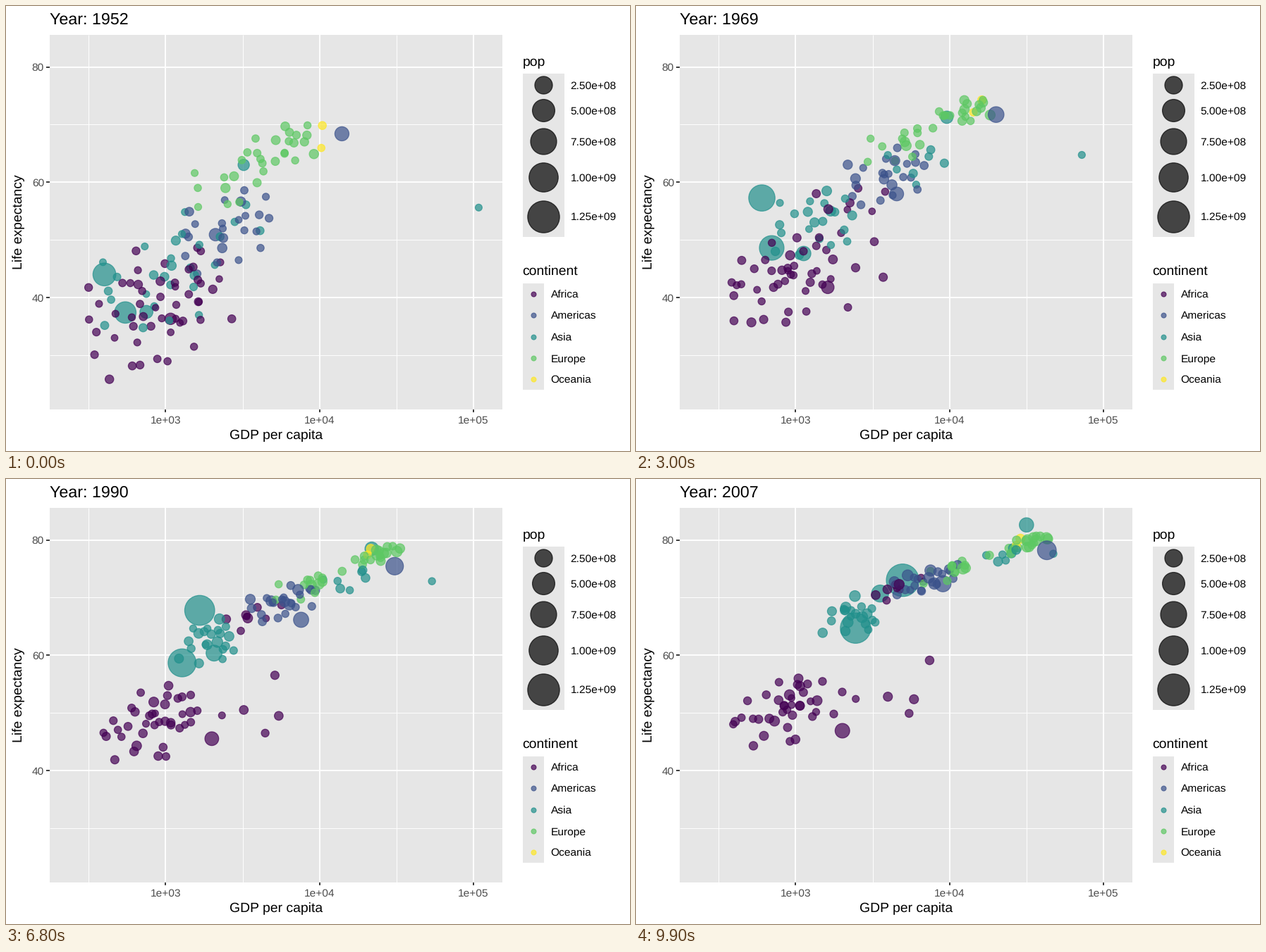
Recreate the animation shown at these times as a matplotlib script. Size 885 by 632 pixels, loop 10000 ms.

```python
import matplotlib.pyplot as plt
import numpy as np
from matplotlib.animation import FuncAnimation
from matplotlib.colors import to_rgba
from matplotlib.patches import Rectangle

W, H, DPI = 885, 632, 64
PT = 72 / DPI  # points per pixel
FRAMES = 100
YEARS = np.arange(1952, 2008, 5)
GREY = "#E6E6E6"
ALPHA = 0.7
LEFT, TOP, RIGHT, BOTTOM = 62, 41, 704, 572.5
BIG, SMALL = 19.35, 15.45

plt.rcParams["font.family"] = "Liberation Sans"
plt.rcParams["text.hinting"] = "none"

COLORS = {
    "Africa": "#440154",
    "Americas": "#3B528B",
    "Asia": "#21908C",
    "Europe": "#5DC863",
    "Oceania": "#FDE725",
}
# Crowds: continent, count, centre in 1952 and 2007 as (log10 income, life)
CROWDS = [
    ("Africa", 36, (2.94, 38.5), (2.97, 52)),
    ("Africa", 8, (3.20, 45), (3.72, 72.5)),
    ("Africa", 7, (3.20, 39), (3.65, 53)),
    ("Americas", 23, (3.46, 53), (3.88, 73.5)),
    ("Asia", 21, (3.00, 43.5), (3.40, 67.5)),
    ("Asia", 7, (3.45, 53), (4.45, 78)),
    ("Europe", 18, (3.82, 67.3), (4.51, 79.6)),
    ("Europe", 12, (3.48, 61), (4.08, 75.3)),
    ("Oceania", 2, (4.03, 69.4), (4.45, 80.7)),
]
# Standouts: continent, millions, (income, life) in 1952, 1977 and 2007
STOPS = (1952, 1977, 2007)
LEADERS = [
    ("Asia", 1319, (400, 44), (741, 63.9), (4959, 73)),
    ("Asia", 1110, (547, 37.4), (790, 54.2), (2452, 64.7)),
    ("Asia", 223, (750, 37.5), (1383, 52.7), (3541, 70.7)),
    ("Asia", 127, (3217, 63), (16610, 75.4), (31656, 82.6)),
    ("Asia", 2.5, (108382, 55.6), (59265, 69.3), (47307, 77.6)),
    ("Africa", 135, (1077, 36.3), (1982, 44.5), (2014, 46.9)),
    ("Americas", 190, (2109, 50.9), (6660, 61.5), (9066, 72.4)),
    ("Americas", 301, (13990, 68.4), (24073, 73.4), (42952, 78.2)),
]

rng = np.random.default_rng(7)
prog = (YEARS - YEARS[0]) / (YEARS[-1] - YEARS[0])
ease = prog + 0.17 * np.sin(np.pi * prog)  # early gains are faster


def px(log_income):
    return 226.4 + (log_income - 3) * 218.2


def py(life):
    return 86.5 + (80 - life) * 8.1875


def size(pop):
    return 2 + 10 * np.sqrt(pop / 1319)


def radius(pop):
    return 0.62 + 1.875 * size(pop)


def bubble(cont, pop, x, y):
    """Path over the five-year knots: pixel x, pixel y, population."""
    return cont, np.column_stack([px(x), py(y), pop * (0.4 + 0.6 * prog)])


def leader(cont, pop, *stops):
    income, life = np.array(stops).T
    return bubble(cont, pop, np.interp(YEARS, STOPS, np.log10(income)),
                  np.interp(YEARS, STOPS, life))


def bell(k, step):
    """Evenly scattered, bell-shaped offset."""
    u = np.clip((0.5 + k * step) % 1, 0.05, 0.95)
    return np.log(u / (1 - u)) / 1.7


def place(centre, z):
    """Scatter around a centre, tighter where life is longer."""
    x, y = centre
    gap = 84 - y
    dx = (0.07 + 0.004 * gap) * z[0]
    return np.array([x + dx, y + 10 * dx + 0.12 * gap * z[1]])


def crowd(cont, count, start, end):
    for k in range(count):
        z = np.array([bell(k, 0.7549), bell(k, 0.5698)])
        a = place(start, z)
        b = place(end, 0.75 * z + 0.55 * rng.normal(size=2))
        path = a + np.outer(ease, b - a)
        path += rng.normal(0, (0.02, 0.3), path.shape)
        pop = np.clip(9 * np.exp(rng.normal()), 0.3, 80)
        yield bubble(cont, pop, *path.T)


people = [b for spec in CROWDS for b in crowd(*spec)]
leaders = [leader(*spec) for spec in LEADERS]
mixed = [people[k] for k in rng.permutation(len(people))]
bubbles = leaders[:-1] + mixed + leaders[-1:]
paths = np.stack([path for _, path in bubbles], axis=1)

fig = plt.figure(figsize=(W / DPI, H / DPI), dpi=DPI, facecolor="white")
ax = fig.add_axes([0, 0, 1, 1])
ax.set(xlim=(0, W), ylim=(H, 0))
ax.axis("off")


def box(x0, y0, x1, y1):
    ax.add_patch(Rectangle((x0, y0), x1 - x0, y1 - y0, fc=GREY, lw=0, zorder=0))


def line(xs, ys, color="white", width=1.87):
    ax.plot(xs, ys, color=color, lw=width * PT, solid_capstyle="butt", zorder=1)


def label(x, y, text, height, color="black", **kw):
    return ax.text(x, y, text, fontsize=height * PT, color=color,
                   va="baseline", **kw)


def dots(x, y, r, colors):
    rgba = [to_rgba(c, ALPHA) for c in colors]
    return ax.scatter(x, y, s=(2 * np.asarray(r) * PT) ** 2, facecolors=rgba,
                      edgecolors=rgba, linewidths=1.25 * PT, zorder=3)


# Panel, grid and axes
box(LEFT, TOP, RIGHT, BOTTOM)
for k in range(3):
    line([px(k + 2.5)] * 2, [TOP, BOTTOM], width=0.94)
    line([LEFT, RIGHT], [py(20 * k + 30)] * 2, width=0.94)
for k in range(3):
    x, y = px(k + 3), py(20 * k + 40)
    line([x, x], [TOP, BOTTOM])
    line([LEFT, RIGHT], [y, y])
    line([x, x], [BOTTOM, BOTTOM + 4.8], "#333333")
    line([LEFT - 4.8, LEFT], [y, y], "#333333")
    label(x, 592.5, f"1e+0{k + 3}", SMALL, "#4D4D4D", ha="center")
    label(54, y + 5.5, f"{20 * k + 40}", SMALL, "#4D4D4D", ha="right")
label(383, 615, "GDP per capita", BIG, ha="center")
label(23.5, 307, "Life expectancy", BIG, ha="center", rotation=90,
      rotation_mode="anchor")
title = label(LEFT, 26.2, "", 23.2)

# Population legend: each key is as tall as its bubble size
label(732.5, 85, "pop", BIG)
y = 96.2
for pop in range(250, 1251, 250):
    half = 2.49 * size(pop)
    y += half
    dots([762], [y], [radius(pop)], ["black"])
    label(800.5, y + 5.8, f"{pop * 1e6:.2e}", SMALL)
    y += half
box(732.5, 96.2, 791.5, y)

# Continent legend
label(732.5, 382, "continent", BIG)
box(732.5, 393.7, 763, 545.3)
for k, (name, color) in enumerate(COLORS.items()):
    y = 409 + 30.36 * k
    dots([748], [y], [3.43], [color])
    label(772.5, y + 5.8, name, SMALL)

cloud = dots(paths[0, :, 0], paths[0, :, 1], radius(paths[0, :, 2]),
             [COLORS[cont] for cont, _ in bubbles])


def draw(i):
    pos = i / (FRAMES - 1) * (len(YEARS) - 1)
    k = min(int(pos), len(YEARS) - 2)
    now = paths[k] + (paths[k + 1] - paths[k]) * (pos - k)
    cloud.set_offsets(now[:, :2])
    cloud.set_sizes((2 * radius(now[:, 2]) * PT) ** 2)
    title.set_text(f"Year: {round(1952 + 55 * i / (FRAMES - 1))}")
    return cloud, title


anim = FuncAnimation(fig, draw, frames=FRAMES, interval=100, repeat=True)
plt.show()
```
